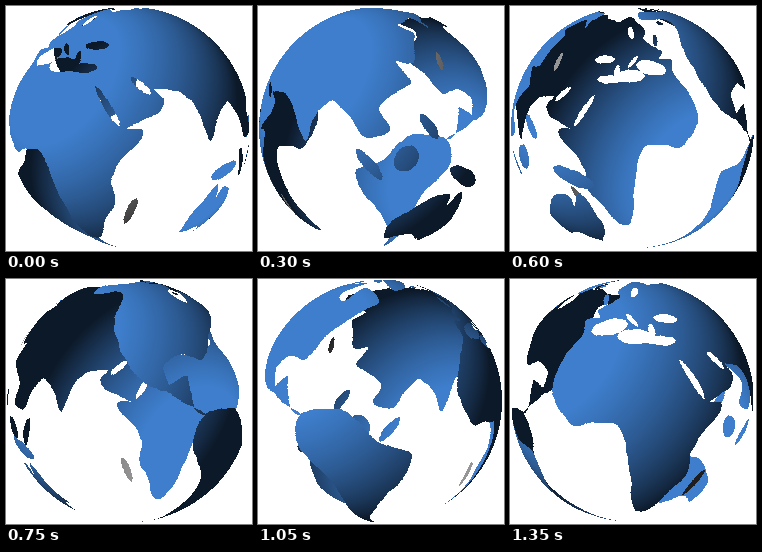
These frames come from a looping animation (246x245 px, 1500 ms). An HTML page with a canvas:

```html
<!DOCTYPE html>
<html>
<head>
<meta charset="utf-8">
<title>Spinning globe</title>
<style>
html, body { margin: 0; width: 100%; height: 100%; overflow: hidden; background: #fff; }
canvas { display: block; width: 100%; height: 100%; }
</style>
</head>
<body>
<canvas id="stage" width="246" height="245"></canvas>
<script>
const W = 246, H = 245, CX = 122.5, CY = 122, R = 121.5;
const EYE = 8, FOCAL = R * Math.sqrt(EYE * EYE - 1);
const STEP_MS = 150, STEPS = 10, START = 53, TURN = 360 / STEPS;
const MAP_W = 1440, MAP_H = 720, DEG = Math.PI / 180;
const BLUE = [62, 126, 204], GREY = [150, 150, 150];
const LIGHT = [-0.62, 0.45, 0.64];

let seed = 7;
function random() {
  seed = (seed * 16807) % 2147483647;
  return seed / 2147483647;
}

// Key capes and bays as longitude,latitude; the coast between them is grown by roughen()
const coast = text => text.trim().split(/\s+/).map(pair => pair.split(',').map(Number));

const oldWorld = coast(`
  -8,36 -17,21 -16,13 -8,4 8,5 13,-8 15,-28 19,-35 27,-34 35,-22 40,-15 39,-5 51,11 44,12 56,17 60,22
  57,26 67,25 72,20 77,8 81,15 90,22 96,16 99,10 106,10 109,13 107,20 121,28 119,36 127,36 133,43
  141,50 137,55 157,60 158,53 164,59 179,66 140,72 113,74 75,72 40,66 26,71 12,66 5,60 8,55 -4,48
  -1,44 -9,43`);
const northAmerica = coast(`
  -167,66 -128,70 -95,69 -82,68 -94,60 -81,53 -78,62 -64,59 -56,52 -66,45 -75,37 -81,27 -90,29 -97,25
  -94,18 -87,21 -83,10 -78,8 -93,15 -106,21 -117,33 -124,42 -135,58 -155,58`);
const southAmerica = coast(`
  -78,8 -62,10 -50,0 -35,-6 -39,-18 -48,-27 -58,-37 -65,-43 -68,-55 -75,-50 -71,-20 -81,-5`);
const australia = coast('114,-23 126,-14 136,-12 138,-17 142,-11 153,-27 149,-38 137,-34 128,-32 115,-35');
const greenland = coast('-45,60 -62,76 -50,82 -22,80 -24,70');

function oval(lon, lat, long, wide, tilt = 0) {
  const c = Math.cos(tilt * DEG), s = Math.sin(tilt * DEG);
  return Array.from({ length: 8 }, (_, i) => {
    const a = long * Math.cos(i * 45 * DEG), b = wide * Math.sin(i * 45 * DEG);
    return [lon + a * c - b * s, lat + a * s + b * c];
  });
}

const islands = [
  oval(114, 2, 5, 4, 50),       // Borneo
  oval(101, 0, 7, 2, -50),      // Sumatra
  oval(140, -5, 9, 3, -22),     // New Guinea
  oval(123, 13, 5, 2, -60),     // Philippines
  oval(-2, 54, 4, 2, -60),      // Britain
  oval(-19, 65, 4, 1.5),        // Iceland
  oval(-75, 75, 14, 4, -20),    // Arctic islands
  oval(-108, 72, 10, 3)
];
const seas = [
  oval(5, 39.5, 9, 3.5, 10),    // Mediterranean
  oval(17, 35.5, 8, 3),
  oval(28, 34, 7, 2),
  oval(16, 42.5, 4, 1.2, -45),  // Adriatic
  oval(25, 38, 3, 1.5, 90),     // Aegean
  oval(34, 43.5, 6.5, 2),       // Black Sea
  oval(38.5, 20, 8, 1.3, -58),  // Red Sea
  oval(52, 27, 4.5, 1.5, -40),  // Persian Gulf
  oval(20, 59, 5, 2.5, 50)      // Baltic
];
const greyIslands = [
  oval(140, 37, 4.5, 1.2, 55),  // Japan
  oval(47, -19, 6.5, 2, 70)     // Madagascar
];

// Repeatedly inserts a smoothed, slightly displaced point between neighbours
function roughen(ring, rounds = 3) {
  if (!rounds) return ring;
  const n = ring.length;
  const finer = ring.flatMap((p, i) => {
    const before = ring[(i + n - 1) % n], q = ring[(i + 1) % n], after = ring[(i + 2) % n];
    const jitter = 0.12 * Math.hypot(q[0] - p[0], q[1] - p[1]);
    const mid = [0, 1].map(k =>
      0.55 * (p[k] + q[k]) - 0.05 * (before[k] + after[k]) + jitter * (random() - 0.5));
    return [p, mid];
  });
  return roughen(finer, rounds - 1);
}

// The map is a cropped, pole-narrowed projection wrapped all round the ball
function project([lon, lat]) {
  const u = lon * (1.15 + 0.0004 * Math.abs(lon)) * (1 - lat * lat / 18000);
  const v = 1.24 * (lat - 12.5);
  return [(u + 180) / 360 * MAP_W, (90 - v) / 180 * MAP_H];
}

function paintMap() {
  const canvas = document.createElement('canvas');
  canvas.width = MAP_W;
  canvas.height = MAP_H;
  const ctx = canvas.getContext('2d', { willReadFrequently: true });
  const fill = (rings, color, mode = 'source-over') => {
    ctx.fillStyle = color;
    ctx.globalCompositeOperation = mode;
    for (const ring of rings) {
      ctx.beginPath();
      for (const point of roughen(ring)) ctx.lineTo(...project(point));
      ctx.fill();
    }
  };
  fill([oldWorld, northAmerica, southAmerica, australia, greenland, ...islands], '#f00');
  fill(seas, '#000', 'destination-out');
  fill(greyIslands, '#0f0');
  return ctx.getImageData(0, 0, MAP_W, MAP_H).data;
}

// Where a sight line meets the ball, with the brightness there; the inside is lit from behind
function hit(dx, dy, t, side) {
  const x = dx * t, y = dy * t, z = EYE - t;
  const lit = side * (x * LIGHT[0] + y * LIGHT[1] + z * LIGHT[2]);
  const lat = Math.asin(Math.max(-1, Math.min(1, y)));
  return {
    row: Math.min(MAP_H - 1, Math.floor((0.5 - lat / Math.PI) * MAP_H)),
    lon: Math.atan2(x, z) / DEG,
    shade: Math.max(0.2, Math.min(1, 0.3 + 0.85 * lit))
  };
}

function castRays() {
  const rays = [];
  for (let py = 0; py < H; py++) {
    for (let px = 0; px < W; px++) {
      const dx = (px + 0.5 - CX) / FOCAL, dy = (CY - py - 0.5) / FOCAL;
      const a = 1 + dx * dx + dy * dy;
      const disc = EYE * EYE - a * (EYE * EYE - 1);
      if (disc < 0) continue;
      const root = Math.sqrt(disc);
      rays.push({
        at: (py * W + px) * 4,
        hits: [hit(dx, dy, (EYE - root) / a, 1), hit(dx, dy, (EYE + root) / a, -1)]
      });
    }
  }
  return rays;
}

const ctx = document.getElementById('stage').getContext('2d');
const image = ctx.createImageData(W, H);
const map = paintMap();
const rays = castRays();

function draw(step) {
  const out = image.data;
  out.fill(255);
  const center = START + TURN * step;
  for (const { at, hits } of rays) {
    for (const { row, lon, shade } of hits) {
      const u = (center + lon + 900) % 360;
      const cell = (row * MAP_W + Math.floor(u / 360 * MAP_W)) * 4;
      if (map[cell + 3] < 128) continue;
      const base = map[cell + 1] > 127 ? GREY : BLUE;
      for (let c = 0; c < 3; c++) out[at + c] = base[c] * shade;
      break;
    }
  }
  ctx.putImageData(image, 0, 0);
}

const begin = performance.now();
let shown = -1;
function tick() {
  const step = Math.floor((performance.now() - begin) / STEP_MS) % STEPS;
  if (step !== shown) draw(shown = step);
  requestAnimationFrame(tick);
}
tick();
</script>
</body>
</html>
```
